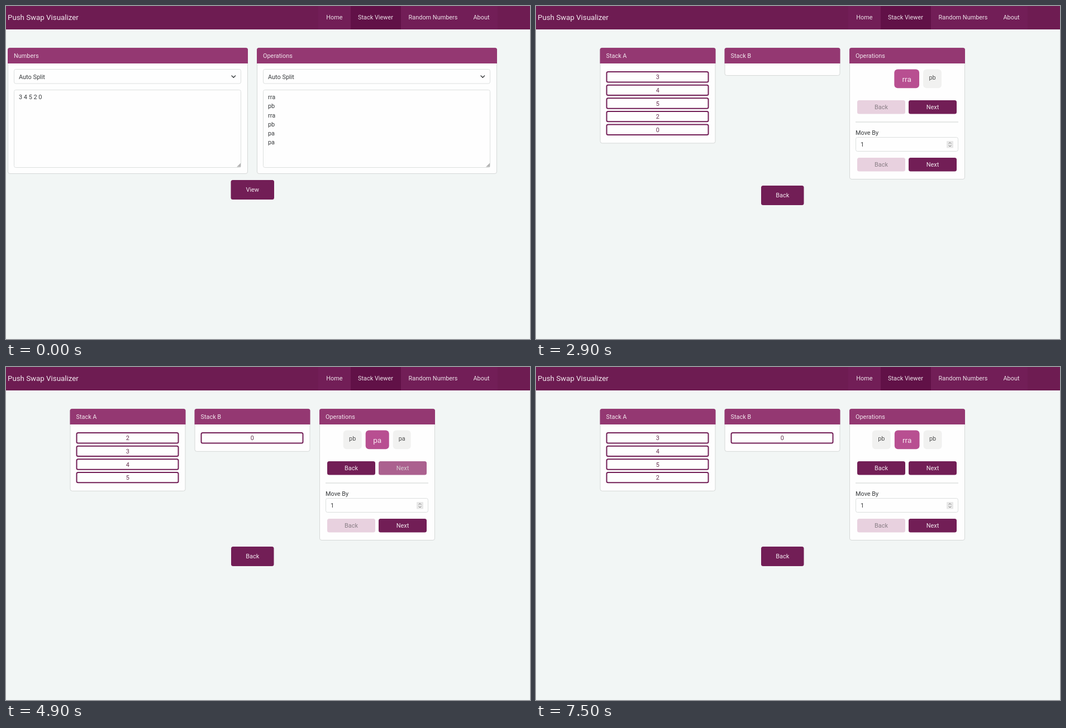
Animation, 938 px wide and 597 px high, one loop 8.8 s. Source, as an HTML page:

```html
<!DOCTYPE html>
<html lang="en">
<head>
<meta charset="utf-8">
<title>Push Swap Visualizer</title>
<style>
  html, body { margin: 0; width: 100%; height: 100%; overflow: hidden; background: #f2f6f5; }
  svg { display: block; font: 10.9px Roboto, "Open Sans", sans-serif; }
</style>
</head>
<body>
<svg id="stage" width="938" height="597" viewBox="0 0 938 597"></svg>
<script>
const LOOP = 8800, STEP = 100;
const DARK = [114, 30, 86], HOVER = [148, 56, 114], PALE = [232, 209, 223];
const LIGHT_TEXT = [244, 234, 240], PALE_TEXT = [136, 126, 133];
const INK = '#373a3c', LINE = '#dcdfde', WHITE = '#fefefe';

const numbers = [3, 4, 5, 2, 0];
const ops = ['rra', 'pb', 'rra', 'pb', 'pa', 'pa'];

// Clicks on the upper buttons, in steps of 100 ms; each takes four steps.
const nextClicks = [30, 34, 38, 43, 47, 51];
const backClicks = [59, 63, 68, 72];

const clamp = v => Math.max(0, Math.min(1, v));
const mix = (a, b, k) => a.map((v, i) => v + (b[i] - v) * k);
const rgb = c => `rgb(${c.map(Math.round)})`;

const rect = (x, y, w, h, fill, r = 0, extra = '') =>
  `<rect x="${x}" y="${y}" width="${w}" height="${h}" rx="${r}" fill="${fill}" ${extra}/>`;
const frame = (x, y, w, h, r = 3, line = LINE) =>
  rect(x + .5, y + .5, w - 1, h - 1, WHITE, r, `stroke="${line}"`);
const text = (x, y, s, fill = INK, anchor = 'start', size = 10.9) =>
  `<text x="${x}" y="${y}" fill="${fill}" text-anchor="${anchor}" font-size="${size}">${s}</text>`;
const path = (d, stroke, width) =>
  `<path d="${d}" fill="none" stroke="${stroke}" stroke-width="${width}" stroke-linecap="round"/>`;

function button(x, y, w, h, label, fill, ink = LIGHT_TEXT) {
  return rect(x, y, w, h, rgb(fill), 3.5) +
    text(x + w / 2, y + h / 2 + 3.9, label, rgb(ink), 'middle');
}

// A button between hovered (0) and disabled (1).
const fading = (x, y, label, k, base = HOVER) =>
  button(x, y, 86, 24.5, label, mix(base, PALE, k), mix(LIGHT_TEXT, PALE_TEXT, k));

function card(x, w, bottom, title) {
  return frame(x, 74.5, w, bottom - 74.5, 3.5, '#d5d8d7') +
    `<path d="M${x} 103V78.5q0-3.5 3.5-3.5H${x + w - 3.5}q3.5 0 3.5 3.5V103z" fill="${rgb(HOVER)}"/>` +
    text(x + 11, 92.7, title, '#f2e6ed');
}

function navbar() {
  const items = [['Home', 588], ['Stack Viewer', 661.5], ['Random Numbers', 764.5], ['About', 851]];
  return rect(0, 0, 938, 42, '#6e1c52') + rect(559, 0, 321, 42, '#721e57') +
    rect(617, 0, 90, 42, '#611147') +
    text(3, 25.3, 'Push Swap Visualizer', '#f4eaf0', 'start', 13.3) +
    items.map(([s, x]) => text(x, 24.3, s, '#eee2e9', 'middle')).join('');
}

function inputCard(x, title, lines) {
  return card(x, 430, 301, title) +
    frame(x + 11, 113, 407, 26.5) + text(x + 20, 130.6, 'Auto Split') +
    path(`M${x + 401} 125l3.3 3.3l3.3 -3.3`, INK, 1.4) +
    frame(x + 11, 150, 407, 140) +
    lines.map((s, i) => text(x + 20, 167 + 16.25 * i, s)).join('') +
    `<path d="M${x + 417} 281.5v7h-7z" fill="#b5b5b5"/>`;
}

function formPage(n) {
  const hover = n >= 8 ? .75 : clamp((n - 2) / 3);
  return inputCard(3, 'Numbers', [numbers.join(' ')]) + inputCard(449, 'Operations', ops) +
    button(402.5, 312, 77.5, 35, 'View', mix(DARK, HOVER, hover));
}

function stacksAfter(count) {
  const a = [...numbers], b = [];
  for (const op of ops.slice(0, count)) {
    if (op === 'rra') a.unshift(a.pop());
    else if (op === 'pb') b.unshift(a.shift());
    else a.unshift(b.shift());
  }
  return { a, b };
}

function stackCard(x, title, stack) {
  const pitch = 23.65;
  const bottom = stack.length ? 128.2 + pitch * stack.length : 125;
  return card(x, 207, bottom, title) + stack.map((v, i) => {
    const y = 117 + pitch * i;
    return rect(x + 12, y + 1, 182, 18.4, WHITE, 2.5, `stroke="${rgb(DARK)}" stroke-width="2"`) +
      text(x + 103.3, y + 14.2, v, '#66304f', 'middle');
  }).join('');
}

function opChips(index) {
  const side = { rra: 35, pb: 33, pa: 32 }, main = { rra: 44.7, pb: 42.5, pa: 42 };
  const slots = [index - 1, index, index + 1].map(i => ops[i]);
  const widths = slots.map((op, i) => i === 1 ? main[op] || 42 : side[op] || 32);
  let x = 664.2 - (widths[0] + widths[1] + widths[2] + 14) / 2;
  return slots.map((op, i) => {
    const left = x, w = widths[i], current = i === 1;
    x += w + 7;
    if (!op) return '';
    return rect(left, 113.5, w, 33.7, current ? '#b84f91' : '#f1f1f0', 6) +
      text(left + w / 2, current ? 136 : 132.4, op, current ? '#f8eaf2' : '#4f4f4f', 'middle', current ? 13.6 : 10.9);
  }).join('');
}

function clickFade(clicks, n, levels) {
  const start = clicks.find(c => n >= c && n < c + 4);
  return start === undefined ? 0 : levels[n - start];
}

function viewerPage(n) {
  const passed = (clicks, delay) => clicks.filter(c => n >= c + delay).length;
  const done = passed(nextClicks, 2) - passed(backClicks, 3);
  const index = passed(nextClicks, 3) - passed(backClicks, 2);
  const { a, b } = stacksAfter(done);

  const nextFade = done === 6 ? 1 : clickFade(nextClicks, n, [.27, 1, .27, 0]);
  const nextBase = n >= 30 && n < 58 ? HOVER : DARK;
  const backFade = index === 0 ? 1 : clickFade(backClicks, n, [.27, 1, 0, 0]);
  const backBase = n === 58 ? mix(DARK, HOVER, .5) : n > 58 && n < 75 ? HOVER : DARK;
  const leaveHover = clamp((n - 9) / 2) * clamp((21 - n) / 3);

  return stackCard(114.5, 'Stack A', a) + stackCard(337.5, 'Stack B', b) +
    card(561, 207, 311, 'Operations') + opChips(index) +
    fading(575, 169, 'Back', backFade, backBase) + fading(667, 169, 'Next', nextFade, nextBase) +
    rect(572, 207.5, 184, 1, '#cdd1d0') +
    text(572, 231, 'Move By') + frame(572, 235, 184, 26) + text(581, 252, '1') +
    rect(735, 242, 12, 12.5, '#e8e8e8', 1) +
    path('M739 246.5l2 -2l2 2M739 250l2 2l2 -2', '#777', 1) +
    fading(575, 272, 'Back', 1) + fading(667, 272, 'Next', 0, DARK) +
    button(403, 322, 76.5, 35, 'Back', mix(DARK, HOVER, leaveHover));
}

const stage = document.getElementById('stage');
let shown = -1;

function draw() {
  const n = Math.floor(performance.now() % LOOP / STEP);
  if (n !== shown) {
    shown = n;
    stage.innerHTML = navbar() + (n < 9 ? formPage(n) : viewerPage(n));
  }
  requestAnimationFrame(draw);
}
draw();
</script>
</body>
</html>
```
